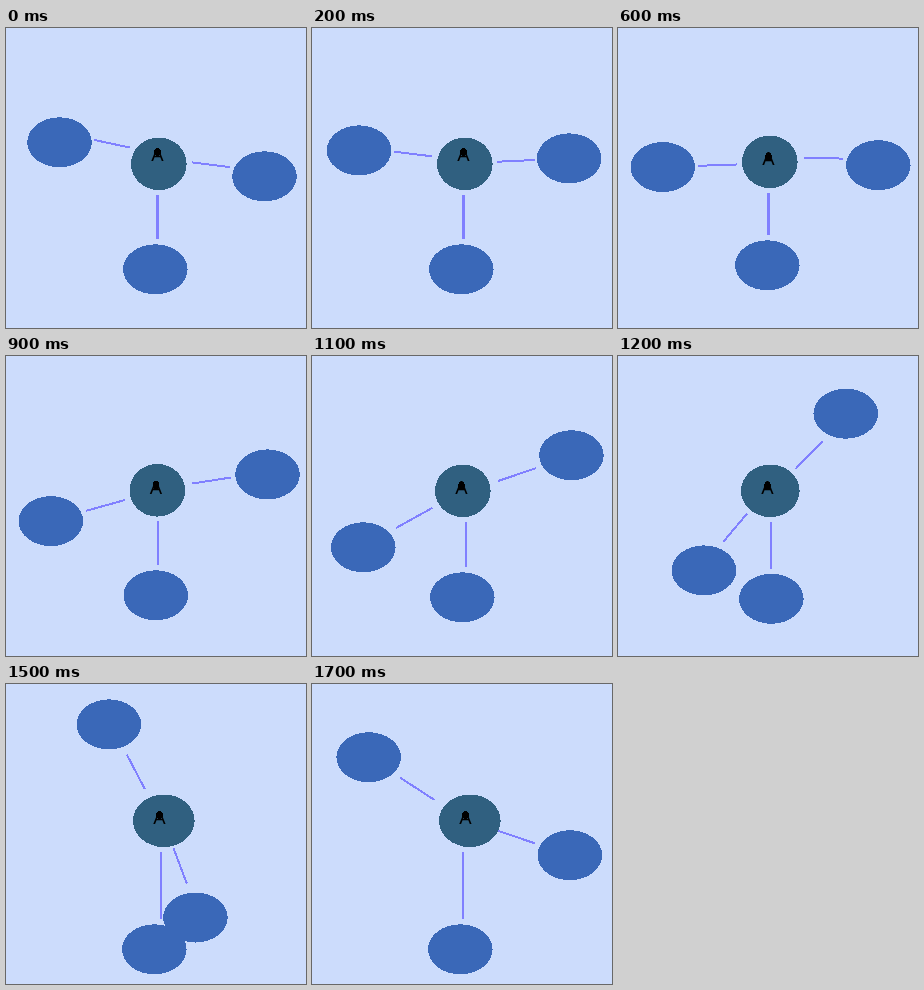
An HTML page for the animation above (1.8 s loop, 300 by 300 pixels).

```html
<!DOCTYPE html>
<html lang="en">
<head>
<meta charset="utf-8">
<title>Orbiting nodes</title>
<style>
  html, body { margin: 0; width: 100%; height: 100%; overflow: hidden; background: #ccdcfc; }
  svg { display: block; shape-rendering: crispEdges; }
  line { stroke: #8080ff; stroke-width: 2; }
  .node { fill: #3a68b8; }
  .hub { fill: #306080; }
  text { font: 18.5px "Liberation Sans", Arial, sans-serif; text-anchor: middle; }
</style>
</head>
<body>
<svg id="stage" width="300" height="300" viewBox="0 0 300 300"></svg>
<script>
const LOOP = 1800;
const CENTER = { x: 152.3, y: 135.3 };
const NODE = { rx: 32.3, ry: 25 };

// Four slow poses, then ten quick ones
const poseAt = ms => ms < 800 ? Math.floor(ms / 200) : 4 + Math.floor((ms - 800) / 100);

// Every track gives one value per key pose; poses between are blended
const KEYS = [0, 1, 3, 7, 9, 11, 13];
const arms = [
  {
    angle: [192, 187, 178, 151, 109, 69.3, 18.8],
    radius: [101, 106, 107.6, 115.5, 91, 105, 111.5],
    lift: [9.5, 3, 0, 1, 6, -4, 0]
  },
  {
    angle: [7, -2.7, 1, -18.6, -73, -117.5, -147],
    radius: [107, 105, 108, 113, 103.5, 107, 114],
    lift: [-5, 0, -6, 1, 4, 2, 0]
  }
];
const stem = {
  x: [149, 149, 149, 150, 156, 148, 148],
  y: [241, 241, 237, 241, 244, 265, 265],
  line: [151.5, 151.5, 150.5, 154, 152, 155, 151]
};
const hub = {
  left: [125, 125, 124, 123, 123, 127, 127],
  right: [180, 180, 179, 178, 184, 188, 188],
  y: [135.5, 135.5, 133.5, 134.5, 134.5, 136.5, 136.5],
  base: [132.5, 132.5, 137, 138, 138, 139.5, 139.5]
};

function sample(tracks, pose) {
  const i = Math.max(0, KEYS.findIndex(k => k >= pose) - 1);
  const u = (pose - KEYS[i]) / (KEYS[i + 1] - KEYS[i]);
  const out = {};
  for (const [name, v] of Object.entries(tracks)) out[name] = v[i] + (v[i + 1] - v[i]) * u;
  return out;
}

const stage = document.getElementById('stage');

function add(tag, cls = '') {
  const el = document.createElementNS('http://www.w3.org/2000/svg', tag);
  el.setAttribute('class', cls);
  return stage.appendChild(el);
}

function set(el, attrs) {
  for (const name in attrs) el.setAttribute(name, attrs[name]);
}

const oval = (el, cx, cy, rx, ry) => set(el, { cx, cy, rx, ry });
const link = (el, [x1, y1], [x2, y2]) => set(el, { x1, y1, x2, y2 });

const spokes = [0, 1, 2].map(() => ({ line: add('line'), node: add('ellipse', 'node') }));
const disc = add('ellipse', 'hub');
const letter = add('text');
const cap = add('ellipse');
letter.textContent = 'A';

function drawArm(arm, { line, node }, pose) {
  const { angle, radius, lift } = sample(arm, pose);
  const c = Math.cos(angle * Math.PI / 180);
  const s = Math.sin(angle * Math.PI / 180);
  const at = (r, side) => [CENTER.x + r * c - side * s, CENTER.y + r * s + side * c];
  link(line, at(radius * 0.31, lift), at(radius * 0.67, lift));
  oval(node, ...at(radius, 0), NODE.rx, NODE.ry);
}

function draw(pose) {
  arms.forEach((arm, i) => drawArm(arm, spokes[i], pose));

  const h = sample(hub, pose);
  oval(disc, (h.left + h.right) / 2 + 0.3, h.y + 0.3, (h.right - h.left) / 2 + 0.3, 26.3);

  const s = sample(stem, pose);
  const { line, node } = spokes[2];
  link(line, [s.line, h.y + 31], [s.line, s.y - 30]);
  line.style.strokeWidth = pose > 3 ? 2 : 3;
  oval(node, s.x + 0.3, s.y + 0.3, NODE.rx, NODE.ry);

  const x = h.left + 26.5;
  set(letter, { x, y: h.base });
  oval(cap, x, h.base - 8.5, 3.2, 4);
}

function tick() {
  draw(poseAt(performance.now() % LOOP));
  requestAnimationFrame(tick);
}
tick();
</script>
</body>
</html>
```
